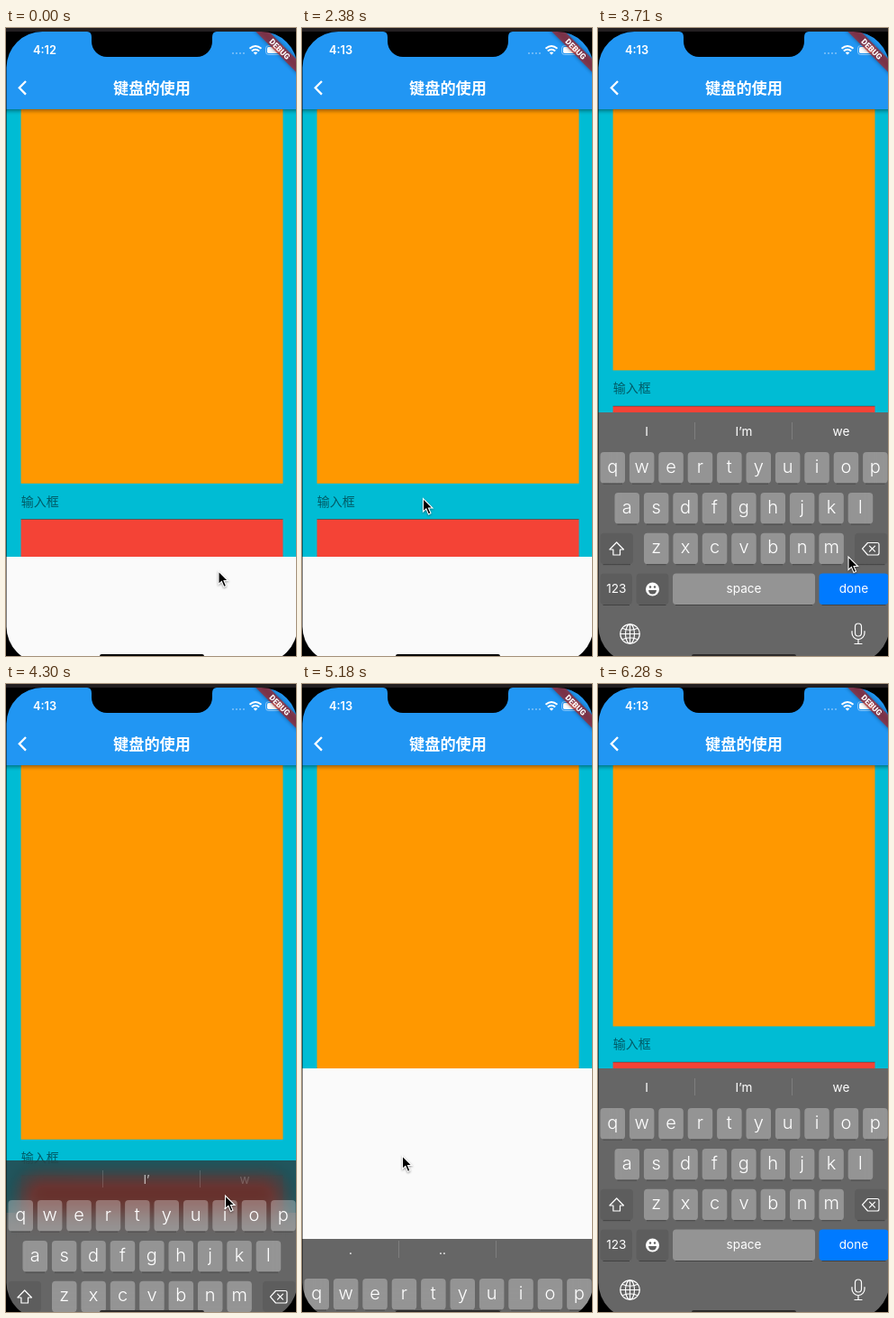
An HTML page for the animation above (6.38 s loop, 322x696 px).

```html
<!DOCTYPE html>
<html lang="zh-CN">
<head>
<meta charset="utf-8">
<title>键盘的使用</title>
<style>
  html, body { margin: 0; width: 100%; height: 100%; overflow: hidden; background: #000; }
  #stage { position: relative; width: 100%; height: 100%; overflow: clip; contain: strict; }
  svg { position: absolute; left: 0; top: 0; overflow: hidden; }
  text { font-family: Inter, "Noto Sans CJK SC", "Noto Sans CJK", sans-serif; }
  #kbd {
    position: absolute; left: 0; width: 322px; overflow: hidden;
    background: rgba(46, 46, 46, .725);
    backdrop-filter: blur(12px) saturate(1.5);
  }
  #kbd text { fill: #fff; text-anchor: middle; font-size: 13.6px; }
  #kbd .letter { font-size: 20px; font-weight: 300; }
  .icon { fill: none; stroke: #fff; stroke-width: 1.2; stroke-linejoin: round; stroke-linecap: round; }
  #bar { filter: drop-shadow(0 2px 2px #0006); }
</style>
</head>
<body>
<div id="stage">
<svg width="322" height="696">
  <rect y="90" width="322" height="500" fill="#00bcd4"/>
  <g id="page">
    <rect x="16.600" width="290.900" height="504.800" fill="#ff9800"/>
    <text x="16.800" y="529.500" font-size="14" fill="#000" fill-opacity=".52">输入框</text>
    <rect x="16.600" y="544.500" width="290.900" height="200" fill="#f44336"/>
    <rect x="16.600" y="544" width="290.900" height="1" fill="#000" fill-opacity=".3"/>
  </g>
  <rect id="blank" width="322" height="400" fill="#fafafa"/>
</svg>

<div id="kbd">
  <svg width="322" height="270" viewBox="0 426 322 270">
    <g id="strip">
      <path d="M107.5 437v19M215.5 437v19" stroke="#fff" stroke-opacity=".16"/>
      <text y="452"></text><text y="452"></text><text y="452"></text>
    </g>
    <g id="keys"></g>
    <g class="icon">
      <path d="M20.700 570l7.800 8h-4v6h-7.600v-6h-4z"/>
      <path d="M299.500 570.500h10.500q2 0 2 2v9.500q0 2 -2 2h-10.500l-6-6.800zM301.500 574.200l6 6M307.500 574.200l-6 6"/>
      <circle cx="35.500" cy="671.500" r="10.700"/>
      <ellipse cx="35.500" cy="671.500" rx="5" ry="10.700"/>
      <path d="M35.500 661v21M25 671.500h21M27.500 665.500q8 3.500 16 0M27.500 677.500q8 -3.500 16 0"/>
      <rect x="285.500" y="660" width="7" height="14" rx="3.500"/>
      <path d="M282 668.500v2a7 7 0 0 0 14 0v-2M289 677.500v5M285 682.500h8"/>
    </g>
    <circle cx="60.500" cy="622" r="7.500" fill="#fff"/>
    <path d="M56 623h9q-.5 4.500-4.500 4.500t-4.500-4.500z" fill="#5e5e5e"/>
    <circle cx="58" cy="619.500" r="1.200" fill="#5e5e5e"/>
    <circle cx="63" cy="619.500" r="1.200" fill="#5e5e5e"/>
  </svg>
</div>

<svg width="322" height="696">
  <rect id="bar" x="-5" width="332" height="90" fill="#2196f3"/>
  <path d="M22 59l-7.200 7.300 7.200 7.300" fill="none" stroke="#fff" stroke-width="2.300"/>
  <text x="162" y="72.500" font-size="17.200" font-weight="700" text-anchor="middle" fill="#fff">键盘的使用</text>

  <text id="clock" x="30" y="29" font-size="12.800" font-weight="600" fill="#fff"></text>
  <path d="M252 28h13" stroke="#fff" stroke-opacity=".4" stroke-width="2.200" stroke-linecap="round" stroke-dasharray="0 4"/>
  <path d="M270.500 22.800q6.500-5.600 13 0M272.800 25.500q4.200-3.600 8.400 0" fill="none" stroke="#fff" stroke-width="2"/>
  <path d="M274.700 27.300q2.300-1.800 4.600 0l-2.300 2.400z" fill="#fff"/>
  <rect x="288.500" y="19.500" width="20" height="10" rx="3" fill="none" stroke="#fff" stroke-opacity=".45"/>
  <rect x="290" y="21" width="17" height="7" rx="1.700" fill="#fff"/>

  <g transform="translate(304 23.300) rotate(45)">
    <rect x="-40" y="-5.200" width="80" height="10.400" fill="#000" style="filter:blur(2px)" opacity=".4"/>
    <rect x="-40" y="-5.200" width="80" height="10.400" fill="#b71c1c" fill-opacity=".63"/>
    <text y="3.200" font-size="8.800" font-weight="900" text-anchor="middle" fill="#fff" style="font-family:Roboto,sans-serif">DEBUG</text>
  </g>

  <rect id="home" x="104" y="694" width="116" height="4.500" rx="2.200"/>
  <path fill-rule="evenodd" d="M-2 0H326V710H-2ZM40.500 4H283.500a40 40 0 0 1 40 40V663.500a40 40 0 0 1-40 40H40.500a40 40 0 0 1-40-40V44a40 40 0 0 1 40-40Z"/>
  <path d="M90 4q5 0 5 6v5a17 17 0 0 0 17 17h100a17 17 0 0 0 17-17v-5q0-6 5-6z"/>
  <rect width="322" height="4" fill="#231f21"/>
  <path id="mouse" d="M0 0V14.500L3.400 11.400L6 17.400L8.500 16.300L6 10.500H10.500Z" fill="#000" stroke="#fff" stroke-width="1.100" style="filter:drop-shadow(0 1px 1px #0006)"/>
</svg>
</div>

<script>
const $ = id => document.getElementById(id);
const LOOP = 6380, HOLD = 596, STEP = 147.6;

// Keyboard
const key = (x, y, w, label, fill = '#ffffff4d', cls = '') =>
  `<rect x="${x}" y="${y}" width="${w}" height="34.5" rx="4" fill="${fill}"/>
   <path d="M${x + 3} ${y + 35}h${w - 6}" stroke="#000" stroke-opacity=".35"/>
   <text class="${cls}" x="${x + w / 2}" y="${y + (cls ? 22.5 : 21.7)}">${label}</text>`;
const row = (letters, x, y) =>
  [...letters].map((c, i) => key(x + i * 32.4, y, 27.5, c, undefined, 'letter')).join('');
const dark = '#00000014';
$('keys').innerHTML =
  row('qwertyuiop', 2.5, 470) + row('asdfghjkl', 18.5, 515) + row('zxcvbnm', 51, 559.7) +
  key(2.5, 559.7, 36.5, '', dark) + key(285, 559.7, 36.5, '', dark) +
  key(2.5, 604.5, 35.5, '123', dark) + key(42.5, 604.5, 36, '', dark) +
  key(83, 604.5, 158, 'space') + key(245.5, 604.5, 77, 'done', '#007aff');

// Pointer track: step, x, y
const track = [
  [-1, 236, 602], [3, 218, 552], [6, 190.5, 507.5], [7, 178, 508], [11, 134.5, 521.5],
  [15, 134.5, 521.5], [21, 278, 586], [22, 286, 612], [24, 284, 612], [25, 243.5, 567],
  [29, 111.5, 523], [31, 111.5, 523], [36, 215, 720], [40, 215, 720]
];
function pointer(n) {
  const i = track.findIndex(p => p[0] >= n);
  if (i < 1) return track[0].slice(1);
  const [a, b] = [track[i - 1], track[i]], u = (n - a[0]) / (b[0] - a[0]);
  return [1, 2].map(k => a[k] + (b[k] - a[k]) * u);
}

const decay = k => .29 ** k;
const labels = document.querySelectorAll('#strip text');
function setStrip(words, xs, alphas, dy) {
  labels.forEach((el, i) => {
    el.textContent = words[i];
    el.setAttribute('x', xs[i]);
    el.setAttribute('opacity', alphas[i]);
  });
  $('strip').setAttribute('transform', `translate(0 ${dy})`);
}

function draw(n) {
  const since = n >= 31 ? n - 31 : n >= 25 ? n - 25 : n - 14;
  const closing = n >= 25 && n < 31;
  const open = n >= 14 && !closing;
  const drop = open ? 189 * decay(since) : closing ? 277 - 175 * decay(since) : 280;
  const top = 426 + (drop < .6 ? 0 : Math.min(drop, 270));

  $('kbd').style.top = top + 'px';
  $('kbd').style.height = 696 - top + 'px';
  $('page').setAttribute('transform', `translate(0 ${open && since > 0 ? -125.4 : 0})`);
  $('blank').setAttribute('y', open ? 426 : 586);
  $('home').setAttribute('fill', drop < 270 ? '#2c2a2a' : '#000');
  $('clock').textContent = n < 12 ? '4:12' : '4:13';

  if (closing) setStrip(['', 'I’', 'w'], [54, 156, 265], [0, .65, .2], 0);
  else if (since === 0) setStrip(['.', '..', ''], [54, 156, 270], [1, 1, 1], -9);
  else setStrip(['I', 'I’m', 'we'], [54, 162, 270], [1, 1, 1], 0);

  $('mouse').setAttribute('transform', `translate(${pointer(n)})`);
}

function tick() {
  const t = performance.now() % LOOP;
  draw(Math.max(-1, Math.floor((t - HOLD) / STEP)));
  requestAnimationFrame(tick);
}
tick();
</script>
</body>
</html>
```
